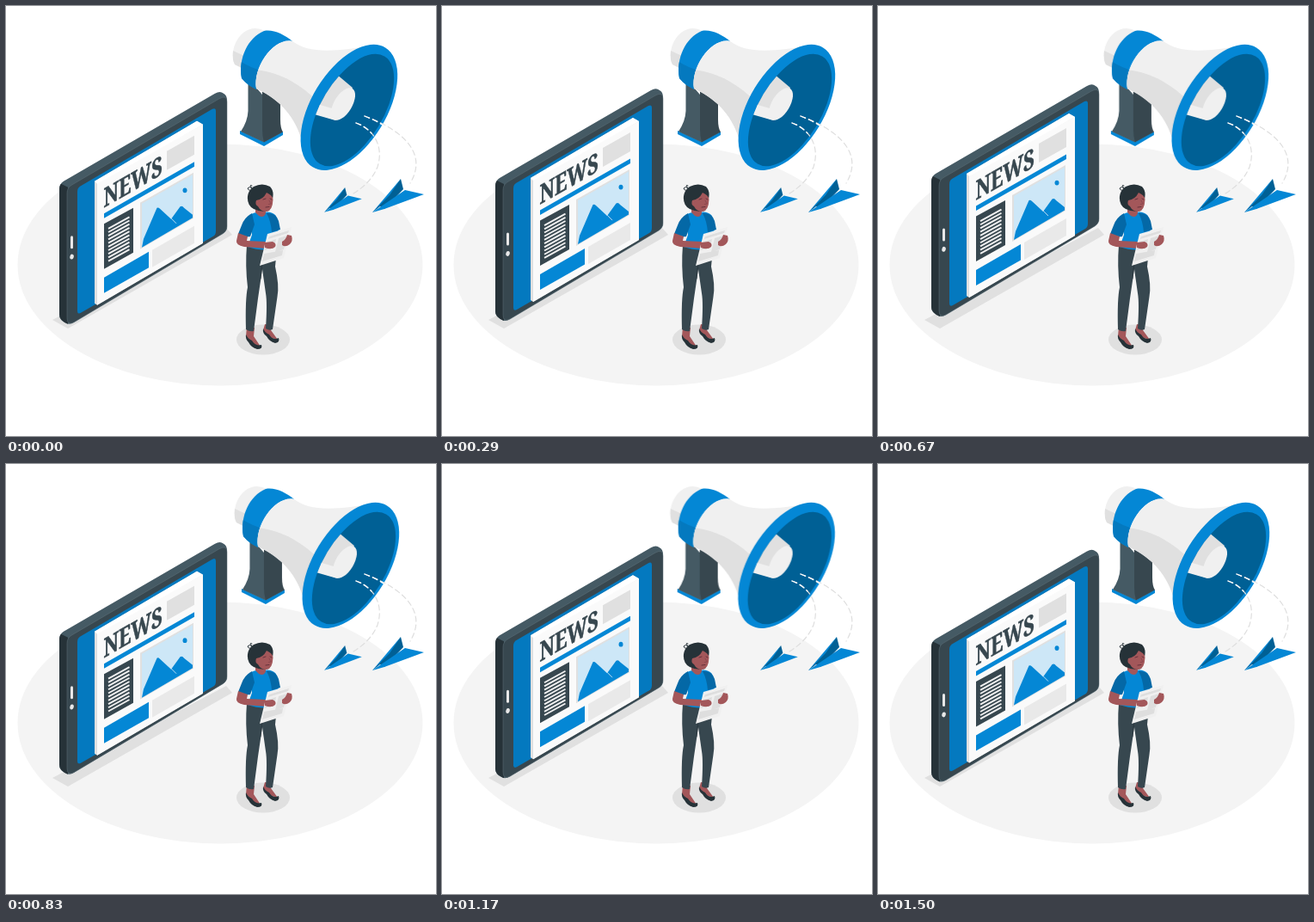
Recreate the animation shown at these times as an HTML page. Size 500 by 500 pixels, loop 1.54 s.

```html
<!DOCTYPE html>
<html lang="en">
<head>
<meta charset="utf-8">
<title>News</title>
<style>
  html, body { margin: 0; width: 100%; height: 100%; overflow: hidden; background: #fff; }
  svg { display: block; width: 100%; height: 100%; }
  .blue { fill: #0487d5; }
  .mid { fill: #0479bf; }
  .navy { fill: #0468a6; }
  .deep { fill: #006095; }
  .dark { fill: #37474f; }
  .slate { fill: #455a64; }
  .hair { fill: #263238; }
  .light { fill: #f0f0f0; }
  .grey { fill: #e0e0e0; }
  .skin { fill: #a3575a; }
  .line { fill: none; stroke-linecap: round; stroke-linejoin: round; }
  .head { font: 700 31px "Noto Serif", "Liberation Serif", serif; stroke: #37474f; stroke-width: .5; }
  .float { animation: float 1540ms linear -1525ms infinite; }
  .shake { animation: shake 1540ms ease -1525ms infinite; }
  @keyframes float {
    0%, 97.4%, 100% { transform: translateY(0); }
    48.7% { transform: translateY(-10px); }
  }
  @keyframes shake {
    0%, 97.4%, 100% { transform: translateX(0); }
    9.74%, 87.66% { transform: translateX(-1px); }
    19.48%, 77.92% { transform: translateX(2px); }
    29.22% { transform: translateX(-2.7px); }
    48.7%, 68.18% { transform: translateX(-4px); }
    38.96%, 58.44% { transform: translateX(4px); }
  }
</style>
</head>
<body>
<svg viewBox="0 0 500 500">
  <defs>
    <clipPath id="bell"><ellipse rx="36" ry="73" transform="translate(402.5 121) rotate(31)"/></clipPath>
    <clipPath id="band"><path id="bandShape" d="M300 29C281 37 270 61 274 84C279 90 285 94 291 97C287 70 312 36 333 41C323 33 311 27 300 29Z"/></clipPath>
    <clipPath id="cone"><path id="coneShape" d="M333 41C352 55 380 54 430 45L368 190C348 184 346 170 344 156C334 122 312 106 291 96C287 70 312 36 333 41Z"/></clipPath>
  </defs>

  <ellipse cx="249" cy="301" rx="235.5" ry="140.5" fill="#f4f4f4"/>
  <path class="grey" d="M54 365L72 375L263 266L256 258Z"/>

  <!-- tablet -->
  <g class="float">
    <g transform="translate(0 .8)">
      <path class="slate" d="M62 213Q62 206 67 203L243 101Q249 97.500 253 101Q257 103 257 109V255Q257 261 252 264L79 367Q73 371 68 367Q62 364 62 358Z"/>
      <path class="hair" d="M62 213Q62 208 64 206L72 210V369Q62 365 62 358Z"/>
      <path class="dark" d="M71 217Q71 210 77 207L248 107Q257 102 257 111V255Q257 261 252 264L79 367Q71 371 71 362Z" stroke="#60727b" stroke-width=".5"/>
      <path class="mid" d="M83 215Q83 211 86 209L240 119Q244 117 244 121V261Q244 265 241 267L87 356Q83 358 83 354Z"/>
      <path class="grey" d="M103 203L222 133L229 137V275L106 347L103 345Z"/>
      <path fill="#fafafa" d="M106 204L229 137V275L106 347Z"/>
      <path fill="#fff" d="M103 203L222 133L229 137L106 206Z"/>
      <text class="head dark" transform="matrix(.72 -.415 0 1 113.500 234)">NEWS</text>
      <path class="grey" d="M187 168L219 150V172L187 190Z"/>
      <path class="blue" d="M114 240.500L219 180.500V186L114 246Z"/>
      <path class="dark" d="M114 252.500L148 234V286L114 305Z"/>
      <g id="rows" stroke="#f0f0f0" stroke-width="1.900"></g>
      <path class="grey" d="M156 228L218 193V246L156 282Z"/>
      <path fill="#cde7f7" d="M158 229L217 195.500V245.500L158 280Z"/>
      <path class="blue" d="M158 280L160 270L175.500 234Q177 233 179 235L192 247L202.500 232.500Q205 231 207 234L217 242V245.500Z"/>
      <path d="M192 246L198 252" stroke="#cde7f7" stroke-width=".9"/>
      <ellipse class="blue" cx="208" cy="213.500" rx="2.500" ry="2.900"/>
      <path fill="#e9e9e9" d="M170 283L219 255V275L170 303Z"/>
      <path class="blue" d="M114 315L166 285V303.500L114 333Z"/>
      <path class="line" d="M76.500 268V280" stroke="#e8e8e8" stroke-width="3"/>
      <ellipse cx="76.500" cy="290.800" rx="2.200" ry="3" fill="#e8e8e8" transform="rotate(15 76.500 291)"/>
    </g>
  </g>

  <!-- megaphone -->
  <g class="shake">
    <path class="blue" d="M272 145L300 158L322 146V150L300 163L272 149Z"/>
    <path class="slate" d="M281.500 84V122Q281 134 273 146L300 158.500L304 110Z"/>
    <path class="dark" d="M298 98V143Q298 152 300 158.500L322 146.500Q319 142 319 132V100Z"/>
    <path class="light" d="M301 29Q288 22 276 31C264 41 261 59 266 68L274 72Z"/>
    <path class="grey" d="M264 52Q263 63 266 68L274 72L277 58Z"/>
    <use href="#bandShape" class="blue"/>
    <path class="mid" clip-path="url(#band)" d="M268 61Q282 72 300 76V102H268Z"/>
    <use href="#coneShape" class="light"/>
    <path class="grey" clip-path="url(#cone)" d="M286 74C318 75 343 92 364 112L370 194H286Z"/>
    <ellipse class="blue" rx="43.600" ry="81.300" transform="translate(398.900 117.900) rotate(31.300)"/>
    <ellipse class="deep" rx="36" ry="73" transform="translate(402.500 121) rotate(31)"/>
    <g clip-path="url(#bell)">
      <path class="grey" d="M384 79L403 95L384 133L355 124Z"/>
      <path class="light" d="M355 112L379 119Q378 128 383 133L355 125Z"/>
    </g>
    <ellipse class="light" rx="10.500" ry="21" transform="translate(392 114) rotate(31)"/>
  </g>

  <!-- paper planes -->
  <g class="line" stroke="#dedede" stroke-width="1.200" stroke-dasharray="6 4">
    <path d="M417 128C450 140 494 166 470 206"/>
    <path d="M407 136C430 144 439 166 432 187Q425 205 404 218"/>
  </g>
  <g class="line" stroke="#fff" stroke-width="1.300" stroke-dasharray="6 4">
    <path d="M417 128Q430 133 441 140"/>
    <path d="M407 136Q418 140 425 148"/>
  </g>
  <g id="plane">
    <path class="blue" d="M426 240L459 201L447 222Z"/>
    <path class="deep" d="M426 240L446 220L459 201L462 213L440 236L435 233Z"/>
    <path class="blue" d="M426 240L464 214L486 219L440 236Z"/>
  </g>
  <use href="#plane" transform="translate(60 62) scale(.728 .741)"/>

  <!-- reader -->
  <ellipse class="grey" cx="299" cy="388" rx="31" ry="17.500"/>
  <path class="skin" d="M280 373L289 374L288 384L296 396L287 393L279 384ZM301 370L309 371L308 377L316 388L306 385L299 377Z"/>
  <path class="hair" d="M279 382Q281 387 286 389Q290 396 297 394Q299 399 292 399Q285 397 282 391Q278 387 279 382ZM299 375Q301 380 306 382Q310 389 317 386Q319 391 313 392Q306 390 303 384Q298 381 299 375Z"/>
  <path class="dark" d="M280 278H314Q315 290 313 303Q318 325 315.500 338L310 376Q306 378 302 375Q304 345 302 334L298 306L293 340L288 378Q283 379 279 376Q278 341 281 327Q278 302 280 278Z"/>
  <path d="M298 297L296 317" class="line" stroke="#263238" stroke-width=".8"/>
  <path class="blue" d="M283 243Q291 238 299 240Q309 238 314 244L317 258L313 282Q298 286 281 280L286 266Z"/>
  <path class="skin" d="M290 231H302V241Q300 247 294 244L290 240Z"/>
  <path class="hair" d="M288 210Q298 205 307 210Q312 215 310 224L306 238Q296 240 288 236Q280 232 281 221Q282 214 288 210Z"/>
  <path class="line" d="M288 213Q282 216 281 212Q283 209 286 212Q282 207 286 209" stroke="#263238" stroke-width="1"/>
  <path class="skin" d="M291 226Q299 225 303 217Q310 220 310.500 225Q310 238 303 239Q296 239 293 233Q289 231 291 226Z"/>
  <path class="line" d="M299 225L302 224M307 224L309 225M302 234L306 233.500" stroke="#5f2e38" stroke-width=".9"/>
  <path class="line" d="M306 226L308 230L305.500 230.500" stroke="#82404a" stroke-width=".7"/>
  <path class="navy" d="M286 241Q277 246 274 255L270 265Q277 269 284 268L289 254Z"/>
  <path class="navy" d="M303 241Q314 240 317 250L319 260L309 263Q308 250 303 241Z"/>
  <path class="skin" d="M270 264L281 268L280 273L302 274Q313 273 314 278Q312 283 302 282L277 280Q267 278 268 273Z"/>
  <path class="light" d="M304 265L332 257L323 293L295 302Z"/>
  <path fill="#dedede" d="M306 268L329 261L328 264L305 271ZM304 274L314 271L312 281L301 284ZM317 270L327 267L323 283L313 286ZM300 288L322 284L321 290L298 297Z"/>
  <path class="skin" d="M301 275L310 274Q315 276 313 280Q309 284 301 281ZM321 274Q326 271 327 266L332 267Q334 273 330 277Q325 281 321 278Z"/>
</svg>
<script>
  const rows = document.getElementById('rows');
  for (let i = 0; i < 10; i++) {
    const y = 258 + i * 4.2;
    const row = document.createElementNS('http://www.w3.org/2000/svg', 'path');
    row.setAttribute('d', `M119 ${y}L143.500 ${y - 13.5}`);
    rows.append(row);
  }
</script>
</body>
</html>
```
